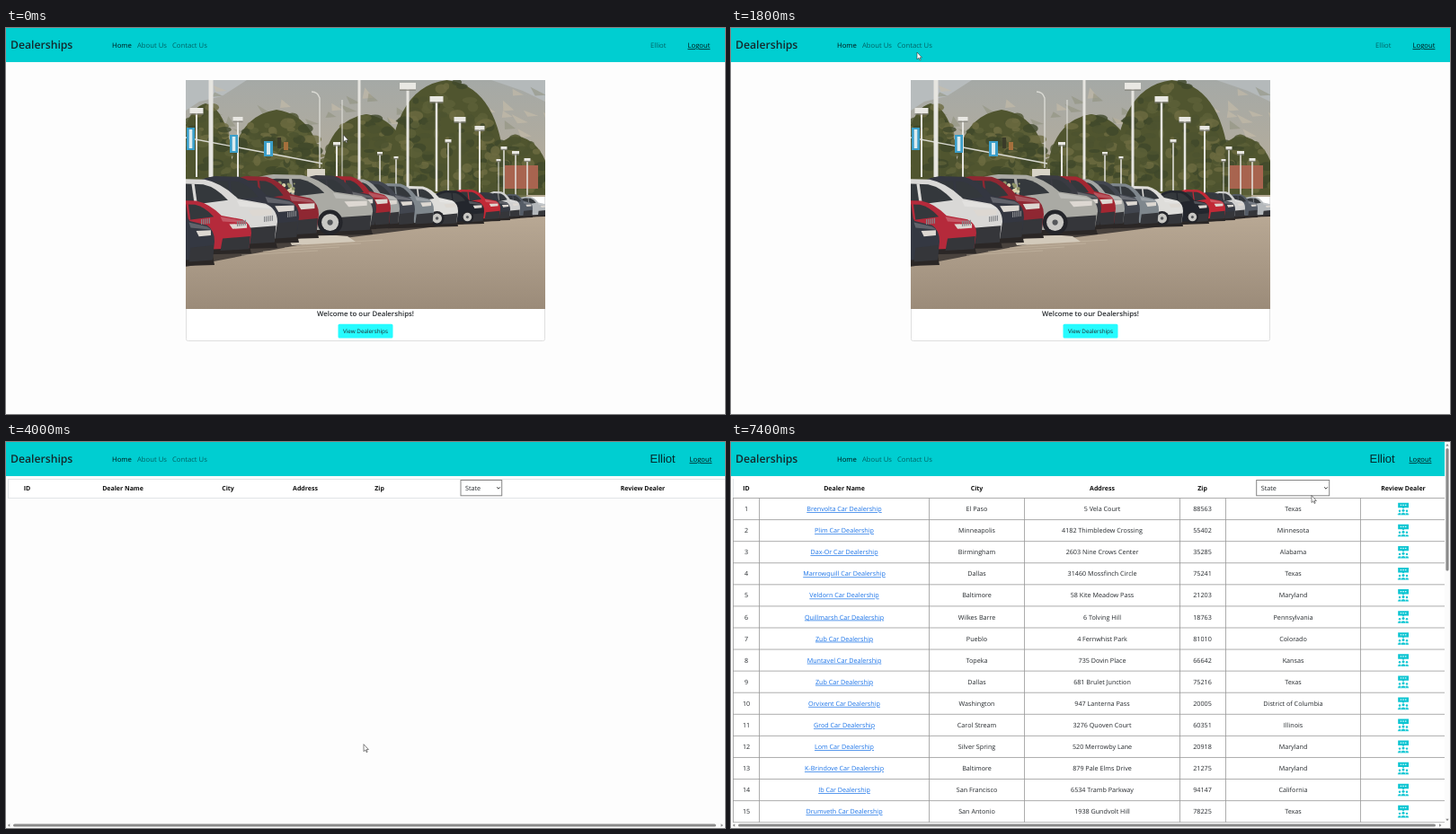
Recreate the animation shown at these times as an HTML page. Size 800 by 430 pixels, loop 8 s.

```html
<!DOCTYPE html>
<html lang="en">
<head>
<meta charset="utf-8">
<title>Dealerships</title>
<style>
html, body { margin: 0; width: 100%; height: 100%; overflow: hidden; background: #fdfdfd; }
svg { display: block; width: 100%; height: 100%; }
text { font-family: "Open Sans", "Noto Sans", sans-serif; font-size: 7.2px; fill: #24282c; text-rendering: geometricPrecision; }
.nav { font-size: 7.7px; fill: rgba(0,0,0,.9); }
.mute { fill: rgba(0,0,0,.53); }
.brand { font-size: 12.2px; font-weight: 600; fill: #14292c; }
.user { font-family: "Liberation Sans", Arial, sans-serif; font-size: 13px; fill: #05282a; }
.u { text-decoration: underline; }
.th { font-size: 7px; font-weight: 700; fill: #111; }
.link { fill: #1a73e8; text-decoration: underline; }
.mid { text-anchor: middle; }
</style>
</head>
<body>
<svg id="stage" viewBox="0 0 800 430" preserveAspectRatio="none">
  <defs>
    <clipPath id="frame"><rect x="200" y="58" width="400" height="255"/></clipPath>
    <linearGradient id="hill" x1="0" y1="0" x2="0" y2="1">
      <stop offset="0" stop-color="#a5a9a6"/><stop offset="1" stop-color="#b9ad98"/>
    </linearGradient>
    <linearGradient id="road" x1="0" y1="0" x2="0" y2="1">
      <stop offset="0" stop-color="#b9a995"/><stop offset="1" stop-color="#9b8b79"/>
    </linearGradient>
  </defs>
  <rect width="800" height="430" fill="#fdfdfd"/>
  <rect width="800" height="38" fill="#00ced1"/>
  <g id="nav"></g>
  <g id="home"></g>
  <g id="empty"></g>
  <g id="table"></g>
  <g id="cursor">
    <path id="arrow" d="M0 0V8L1.9 6.3 3.1 9 4.2 8.5 3 5.9H5.4Z" fill="#fff" stroke="#333" stroke-width=".6"/>
    <path id="hand" d="M-.8 0Q0-1 .8 0V2.6L3.2 3.2Q4 3.5 3.9 4.5L3.2 7.6H-.9L-2.8 4.4Q-2.4 3.5-.8 4.8Z" fill="#fff" stroke="#333" stroke-width=".6"/>
  </g>
</svg>
<script>
const $ = id => document.getElementById(id);
const LOOP = 8000, STEP = 200;

function add(parent, tag, attrs, content) {
  const node = document.createElementNS('http://www.w3.org/2000/svg', tag);
  for (const key in attrs) node.setAttribute(key, attrs[key]);
  if (content !== undefined) node.textContent = content;
  return parent.appendChild(node);
}
const rect = (p, x, y, width, height, fill, more) => add(p, 'rect', { x, y, width, height, fill, ...more });
const path = (p, d, fill, more) => add(p, 'path', { d, fill, ...more });
const line = (p, d, stroke, width = 1) => path(p, d, 'none', { stroke, 'stroke-width': width });
const label = (p, x, y, s, cls = '') => add(p, 'text', { x, y, class: cls }, s);

let seed = 7;
const rnd = () => (seed = seed * 16807 % 2147483647) / 2147483647;

// ---- navigation bar
const nav = $('nav');
label(nav, 5, 22.6, 'Dealerships', 'brand');
label(nav, 118, 22.3, 'Home', 'nav');
label(nav, 146, 22.3, 'About Us', 'nav mute');
label(nav, 185, 22.3, 'Contact Us', 'nav mute');

function account(p, userX, logoutX, cls) {
  label(p, userX, cls === 'user' ? 23.4 : 22.3, 'Elliot', cls);
  label(p, logoutX, 22.3, 'Logout', 'nav u');
}

// ---- home page
function blobs(p, x0, x1, top, bottom, count) {
  const tones = ['#4c5230', '#5c6038', '#6d6b41', '#3f472b'];
  const mid = (x0 + x1) / 2, half = (x1 - x0) / 2;
  path(p, `M${x0} ${bottom}Q${x0} ${top + 8} ${mid} ${top}Q${x1} ${top + 8} ${x1} ${bottom}Z`, '#50552f');
  for (let i = 0; i < count; i++) {
    const a = rnd() * 2 - 1;
    const edge = top + (bottom - top) * .55 * a * a;
    add(p, 'ellipse', {
      cx: mid + a * half * .95, cy: edge + rnd() * (bottom - edge),
      rx: 3 + rnd() * 6, ry: 2 + rnd() * 4, fill: tones[i % 4], opacity: .8
    });
  }
}

function car(p, [x, y, w, h, color, wheel]) {
  const g = add(p, 'g', { transform: `translate(${x} ${y}) scale(${w} ${h})` });
  path(g, 'M0 .86L.98 .84 1 1 0 1.05Z', '#2b2726');
  path(g, 'M0 .42Q.06 .06 .3 0L.5 .01Q.62 .06 .73 .29L.92 .36Q1 .44 1 .62L.98 .9 0 .97Z', color);
  path(g, 'M.06 .35Q.16 .1 .32 .07L.49 .08Q.58 .12 .66 .31L.4 .38Z', '#34383c');
  line(g, 'M.42 .07L.44 .37', color, .02);
  path(g, 'M.72 .31L.92 .38 .97 .43 .74 .4Z', '#fff', { opacity: .22 });
  path(g, 'M.8 .45L.96 .44 .96 .52 .83 .54Z', '#ddd8d2');
  path(g, 'M.74 .72L.99 .68 .98 .92 .72 .95Z', '#35363a');
  if (wheel) {
    for (const [r, fill] of [[1, '#24252a'], [.68, '#c9c8c4'], [.22, '#55575a']])
      add(p, 'circle', { cx: x + w * .7, cy: y + h * .8, r: wheel * r, fill });
  }
}

function pole(p, [x, top, bottom, width, head]) {
  line(p, `M${x} ${top}V${bottom}`, '#e6e5e0', width);
  if (head) {
    rect(p, x - head / 2, top - 3, head, head * .42, '#e9e8e3');
    rect(p, x - head / 2, top - 3 + head * .42, head, 1.2, '#85847c');
  }
}

function photo(p) {
  const g = add(p, 'g', { 'clip-path': 'url(#frame)' });
  rect(g, 200, 58, 400, 130, 'url(#hill)');
  path(g, 'M200 58H268L240 76 215 82 200 92Z', '#b7bcbd');
  path(g, 'M540 58H600V82L575 70Z', '#b4b9ba');
  for (let i = 0; i < 60; i++) {
    const x = 200 + rnd() * 400, y = 64 + rnd() * 70;
    path(g, `M${x} ${y}l${8 + rnd() * 12} ${4 + rnd() * 8}l-12 1Z`, i % 2 ? '#8e8f7c' : '#c9bea9', { opacity: .55 });
  }
  blobs(g, 192, 252, 84, 172, 50);
  blobs(g, 250, 352, 91, 172, 100);
  blobs(g, 350, 452, 96, 184, 90);
  blobs(g, 425, 556, 58, 184, 150);
  blobs(g, 530, 606, 120, 186, 50);
  rect(g, 555, 153, 37, 26, '#a8644f');
  rect(g, 335, 157, 20, 9, '#d8d3c7');

  line(g, 'M200 122L258 133 352 151', '#d9d9d2', 1.4);
  line(g, 'M349 156V78Q347 71 340 71', '#dadad4', 1.4);
  [[228, 58, 166, 5], [393, 58, 172, 3], [212, 92, 166, 2, 15], [258, 102, 166, 2, 11],
   [374, 80, 170, 1], [368, 130, 166, 2, 8], [447, 64, 180, 3, 18], [479, 79, 182, 2.5, 15],
   [505, 102, 184, 2.5, 13], [527, 112, 184, 2, 11], [492, 127, 184, 1.5, 7], [554, 135, 186, 1.5, 7],
   [567, 140, 186, 1.5, 8], [580, 148, 186, 1.5, 7], [416, 141, 178, 1.5, 6], [434, 146, 178, 1.5, 5],
   [548, 149, 186, 1, 5]].forEach(a => pole(g, a));
  for (const [x, y, w, h] of [[201, 111, 9, 25], [249, 119, 9, 20], [287, 126, 10, 17]]) {
    rect(g, x, y, w, h, '#3b9fca');
    rect(g, x + w * .3, y + 2, w * .4, h - 4, '#dcecef');
  }
  rect(g, 302, 122, 4, 12, '#3a3a28');
  rect(g, 309, 127, 5, 9, '#a5703c');

  path(g, 'M200 240L400 218 600 207V313H200Z', 'url(#road)');
  path(g, 'M200 236L410 216 600 203V209L480 221 345 238 200 266Z', '#49423d');
  for (let i = 0; i < 4; i++) line(g, `M${262 + i * 24} ${253 - i * 4}l85 -5`, '#c6b9a5', .6);
  path(g, 'M316 238Q340 227 380 232L389 238 318 242Z', '#d3cabb');

  [[566, 188, 36, 22, '#b4b8bb'], [548, 185, 38, 26, '#555c66'], [530, 182, 42, 30, '#d0d0cf'],
   [515, 183, 46, 31, '#353942'], [488, 180, 62, 35, '#c22936'], [470, 181, 62, 37, '#23262d', 7],
   [425, 176, 78, 45, '#deddda', 8], [402, 173, 74, 48, '#7f878d'], [375, 170, 80, 52, '#42464f'],
   [358, 168, 80, 54, '#a3a5a3'], [340, 165, 88, 58, '#a32631'], [316, 164, 96, 60, '#3a3b42'],
   [250, 163, 158, 67, '#aaaaa4', 14]].forEach(a => car(g, a));
  for (let i = 0; i < 36; i++)
    add(g, 'circle', { cx: 280 + rnd() * 42, cy: 172 + rnd() * 16, r: 1 + rnd() * 1.5, fill: i % 2 ? '#d9d2ac' : '#8f9468' });
  [[232, 165, 116, 69, '#8f2732'], [192, 165, 134, 74, '#343741'], [140, 168, 162, 77, '#d9d8d6'],
   [150, 192, 123, 59, '#b52a3b'], [130, 195, 102, 69, '#343842']].forEach(a => car(g, a));
  for (const [x, y] of [[217, 213], [257, 215], [287, 210], [313, 205]])
    for (let i = 0; i < 5; i++) rect(g, x + i * 2.2, y - i * .3, 1.2, 6, '#85878a');
}

const home = $('home');
account(home, 717, 758.5, 'nav mute');
rect(home, 200.5, 58.5, 399, 290, '#fff', { stroke: '#dfdfdf', rx: 2 });
photo(home);
label(home, 400, 320.9, 'Welcome to our Dealerships!', 'mid').style.cssText = 'font-size:7.8px;font-weight:600';
const ring = rect(home, 368.5, 328.5, 63, 18, '#8fdcf2', { rx: 2.5 });
rect(home, 369.5, 329.8, 61, 15.8, '#26fbff', { rx: 1.6 });
label(home, 400, 340, 'View Dealerships', 'mid').style.fontSize = '6.3px';

// ---- table pages
const heads = ['ID', 'Dealer Name', 'City', 'Address', 'Zip', '', 'Review Dealer'];

function header(p, centers, selX, selW) {
  heads.forEach((s, i) => label(p, centers[i], 54.1, s, 'th mid'));
  rect(p, selX, 42.5, selW, 17.3, '#fff', { stroke: '#858585' });
  label(p, selX + 5, 54, 'State');
  line(p, `M${selX + selW - 5.6} 50.3l1.9 1.9 1.9 -1.9`, '#222', .9);
}

function scrollX(p, width, end) {
  rect(p, 0, 424, 800, 6, '#fbfbfb');
  rect(p, 8, 425.4, width, 3.2, '#8a8a8a', { rx: 1.6 });
  path(p, `M4.3 425.2V428.8L1.8 427ZM${end} 425.2V428.8l2.5 -1.8Z`, '#8a8a8a');
}

const empty = $('empty');
account(empty, 716.5, 760.5, 'user');
rect(empty, 2.5, 41.5, 800, 21, '#fff', { stroke: '#e1e4e7' });
header(empty, [23.5, 130, 247, 333, 415.5, 0, 708.5], 506, 45.7);
scrollX(empty, 782, 795.5);

const rows = `Brenvolta|El Paso|5 Vela Court|88563|Texas
Plim|Minneapolis|4182 Thimbledew Crossing|55402|Minnesota
Dax-Or|Birmingham|2603 Nine Crows Center|35285|Alabama
Marrowquill|Dallas|31460 Mossfinch Circle|75241|Texas
Veldorn|Baltimore|58 Kite Meadow Pass|21203|Maryland
Quillmarsh|Wilkes Barre|6 Tolving Hill|18763|Pennsylvania
Zub|Pueblo|4 Fernwhist Park|81010|Colorado
Muntavel|Topeka|735 Dovin Place|66642|Kansas
Zub|Dallas|681 Brulet Junction|75216|Texas
Orvixent|Washington|947 Lanterna Pass|20005|District of Columbia
Grod|Carol Stream|3276 Quoven Court|60351|Illinois
Lom|Silver Spring|520 Merrowby Lane|20918|Maryland
K-Brindove|Baltimore|879 Pale Elms Drive|21275|Maryland
Ib|San Francisco|6534 Tramb Parkway|94147|California
Drumveth|San Antonio|1938 Gundvolt Hill|78225|Texas`.split('\n').map(r => r.split('|'));

function reviewIcon(p, x, y) {
  const g = add(p, 'g', { transform: `translate(${x} ${y})`, fill: '#0cc5d2' });
  path(g, 'M-5.8 -6.8H6V-1.4H1.2L0 -.2 -1.2 -1.4H-5.8Z');
  for (let i = -1; i < 2; i++) rect(g, i * 2.6 - .7, -4.9, 1.5, 1.3, '#d9f8fa');
  for (const [cx, s, top] of [[-4, .8, 2.2], [4, .8, 2.2], [0, 1, 1.6]]) {
    add(g, 'circle', { cx, cy: top, r: 1.5 * s });
    path(g, `M${cx - 2.6 * s} 7V${5.6}Q${cx} ${top + .8} ${cx + 2.6 * s} 5.6V7Z`, '#0cc5d2', { stroke: '#fff', 'stroke-width': .4 });
  }
}

const table = $('table');
const centers = [17, 126, 273.5, 413, 524.5, 625.5, 748];
const PITCH = 24.08, TOP = 62.5;
account(table, 710.5, 754.5, 'user');
rect(table, 2, 38, 792, 386, '#fff');
header(table, centers, 584.7, 81);
line(table, 'M2.5 41V62', '#e1e4e7');
rows.forEach(([name, ...cells], i) => {
  const mid = TOP + PITCH * (i + .5), base = mid + 2.6;
  label(table, centers[0], base, i + 1, 'mid');
  label(table, centers[1], base, name + ' Car Dealership', 'mid link');
  cells.forEach((s, k) => label(table, centers[k + 2], base, s, 'mid'));
  reviewIcon(table, centers[6], mid);
});
for (let i = 0; i <= rows.length; i++) line(table, `M2 ${TOP + PITCH * i}H794`, '#999', .8);
for (const x of [2.5, 31.5, 220.5, 326.5, 499.5, 550.5, 700.5]) line(table, `M${x} ${TOP}V423.7`, '#999', .8);
scrollX(table, 776, 788);
rect(table, 794, 0, 6, 424, '#fbfbfb');
rect(table, 795.4, 7, 3.2, 136.5, '#8a8a8a', { rx: 1.6 });
path(table, 'M795.2 4.4H798.8L797 1.9ZM795.2 419.8H798.8L797 422.3Z', '#8a8a8a');

// ---- pointer: [time, x, y], hidden between null points
const track = [
  [0, 375.5, 119], [200, 372, 150], [400, null], [800, 400, 325], [1000, 300, 210], [1200, 190, 98],
  [1400, 150, 50], [1600, 160, 18], [1800, 207, 27], [2000, 480, 24], [2200, 770, 18],
  [2400, 600, 350], [2800, 440, 366], [3200, 398, 337.5], [4200, 398, 336.5], [4400, null],
  [5000, 22, 50], [5200, 240, 52], [5600, 748, 74], [5800, 480, 404], [6000, 148, 311],
  [7000, 148, 311], [7400, 646, 59.5], [8000, 646, 59.5]
];

function pointer(t) {
  const i = track.findLastIndex(k => k[0] <= t);
  const [t0, x0, y0] = track[i], [t1, x1, y1] = track[i + 1];
  if (x0 === null) return null;
  if (x1 === null) return [x0, y0];
  const f = (t - t0) / (t1 - t0);
  return [x0 + (x1 - x0) * f, y0 + (y1 - y0) * f];
}

const show = (node, on) => { node.style.display = on ? '' : 'none'; };

function render(ms) {
  const t = Math.floor(ms % LOOP / STEP) * STEP;
  show(home, t < 4000);
  show(empty, t >= 4000 && t < 4400);
  show(table, t >= 4400);
  show(ring, t >= 3400);

  const at = pointer(t);
  show($('cursor'), at);
  if (at) $('cursor').setAttribute('transform', `translate(${at})`);
  const onLink = t >= 3200 && t < 4000 || t >= 6000 && t <= 7000;
  show($('hand'), onLink);
  show($('arrow'), !onLink);
}

const start = performance.now();
function tick() {
  render(performance.now() - start);
  requestAnimationFrame(tick);
}
tick();
</script>
</body>
</html>
```
